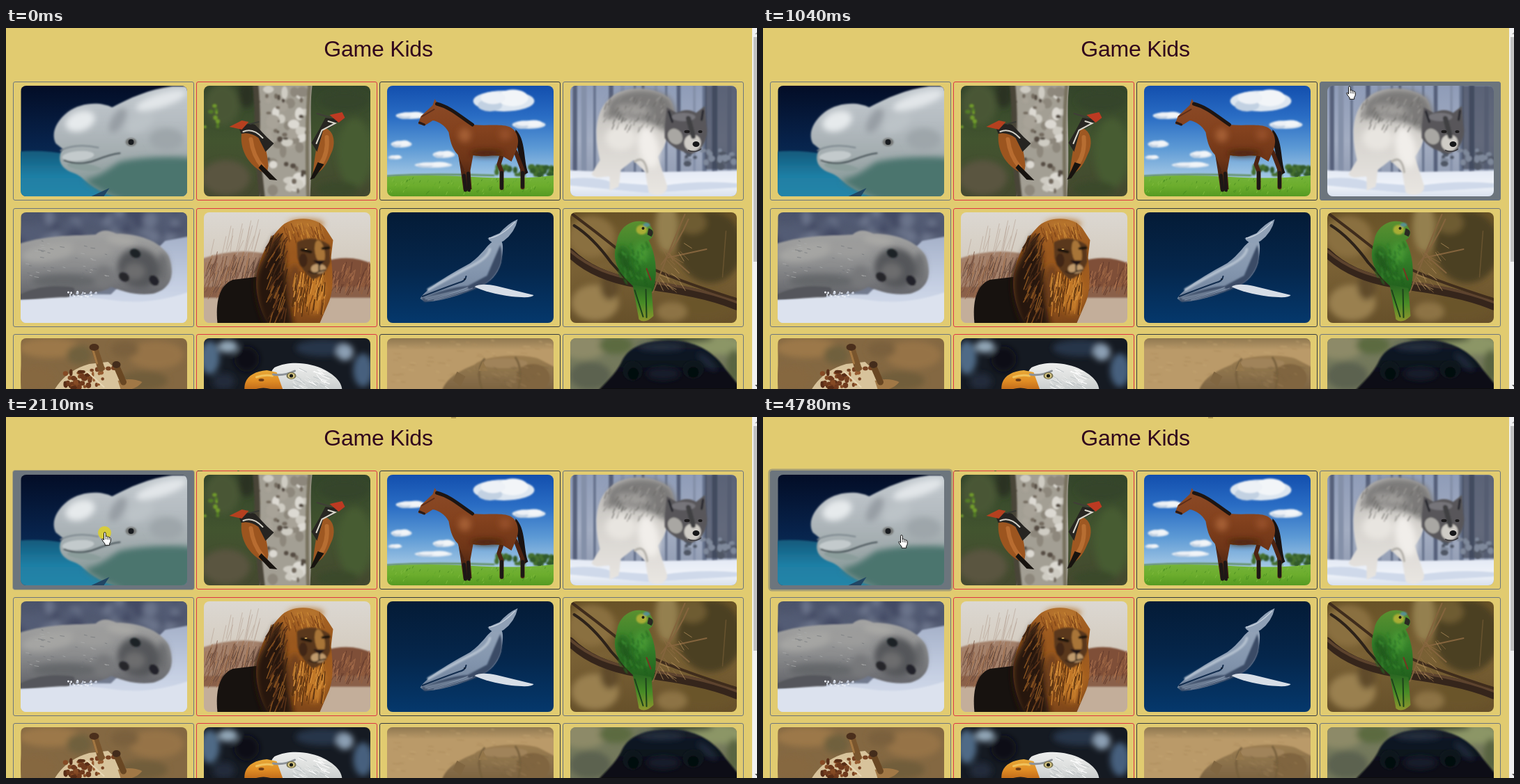
An HTML page that plays this animation: 1078x519 px, repeating every 8000 ms.

```html
<!DOCTYPE html>
<html lang="en">
<head>
<meta charset="utf-8">
<title>Game Kids</title>
<style>
html, body { margin: 0; width: 100%; height: 100%; overflow: hidden; background: #e1cb70; }
#stage { position: relative; width: 1078px; height: 519px; overflow: hidden; }
#stage > * { position: absolute; }
h1 { margin: 0; left: 0; top: 11px; width: 1069px; text-align: center; color: #30051c; letter-spacing: -.2px;
  font: 400 32px/38px "Liberation Sans", Arial, sans-serif; }
.card { box-sizing: border-box; width: 260px; height: 171px; border: 1px solid; border-radius: 3px; }
.photo { position: absolute; left: 9.5px; top: 5px; width: 239px; height: 159px; border-radius: 8px; }
.bar { left: 1071px; top: 0; width: 7px; height: 519px; background: #f1f1f1; }
.thumb { left: 1073px; top: 13px; width: 5px; height: 323px; background: #c1c1c1; }
.mark { background: #6d3930; height: 1px; top: 77px; }
#dot { left: 639px; top: 0; width: 7px; height: 2px; background: #b49d55; }
#ring { left: 132px; top: 157px; width: 19px; height: 19px; border-radius: 50%; background: rgba(222,208,40,.85); }
#hand { left: 0; top: 0; }
</style>
</head>
<body>
<div id="stage">
  <svg width="0" height="0"><defs id="defs">
    <filter id="b1" x="-20%" y="-20%" width="140%" height="140%"><feGaussianBlur stdDeviation="1"/></filter>
    <filter id="b4" x="-30%" y="-30%" width="160%" height="160%"><feGaussianBlur stdDeviation="4"/></filter>
  </defs></svg>
  <h1>Game Kids</h1>
  <div class="bar"></div><div class="thumb"></div>
  <svg style="left:1071px;top:0" width="7" height="519">
    <path d="M4 9L8 5V9Z" fill="#a3a3a3"/><path d="M4 513L8 517V513Z" fill="#505050"/>
  </svg>
</div>
<script>
const stage = document.getElementById('stage');
const defs = document.getElementById('defs');
let seed = 7, gradCount = 0;
const rnd = () => (seed = (seed * 16807) % 2147483647) / 2147483647;
const between = (a, b) => a + rnd() * (b - a);

// Drawing helpers; all photos use stage coordinates.
const P = (d, fill) => `<path d="${d}" fill="${fill}"/>`;
const L = (d, color, w) => `<path d="${d}" fill="none" stroke="${color}" stroke-width="${w}" stroke-linecap="round"/>`;
const E = (x, y, rx, ry, fill, turn = 0) =>
  `<ellipse cx="${x}" cy="${y}" rx="${rx}" ry="${ry}" fill="${fill}" transform="rotate(${turn} ${x} ${y})"/>`;
const R = (x, y, w, h, fill) => `<rect x="${x}" y="${y}" width="${w}" height="${h}" fill="${fill}"/>`;
const soft = (...s) => `<g filter="url(#b1)">${s.join('')}</g>`;
const haze = (...s) => `<g filter="url(#b4)">${s.join('')}</g>`;
function G(...colors) {
  const id = 'g' + gradCount++;
  const stops = colors.map((c, i) => `<stop offset="${i / (colors.length - 1)}" stop-color="${c}"/>`).join('');
  defs.insertAdjacentHTML('beforeend', `<linearGradient id="${id}" x2="0" y2="1">${stops}</linearGradient>`);
  return `url(#${id})`;
}
function specks(n, x, y, w, h, size, ...colors) {
  let s = '';
  for (let i = 0; i < n; i++)
    s += E(between(x, x + w), between(y, y + h), between(.4, 1) * size, between(.4, 1) * size,
      colors[i % colors.length]);
  return s;
}
function strands(n, x, y, w, h, dx, dy, width, ...colors) {
  let s = '';
  for (let i = 0; i < n; i++) {
    const a = between(x, x + w), b = between(y, y + h);
    s += L(`M${a} ${b}l${dx * between(.3, 1)} ${dy * between(.4, 1)}`, colors[i % colors.length], width);
  }
  return s;
}

function beluga() {
  return R(21, 83, 239, 159, G('#030d26', '#07224a', '#0b3a66')) +
    soft(P('M15 178Q50 174 90 182L266 184V250H15Z', G('#135a7c', '#1f7fa5', '#2787a8'))) +
    soft(P('M264 84H238C205 88 176 101 152 114C136 106 108 106 88 121C70 135 64 153 71 166L81 174C75 182 75 194 83 201C90 208 100 208 108 215C124 230 142 240 170 246H264Z',
      G('#c3cacf', '#b4bbc0', '#9fa9ab', '#75908d'))) +
    haze(E(106, 134, 22, 14, '#e6eaec', -20), E(222, 104, 38, 10, '#e2e6e9', -18), E(160, 133, 9, 20, '#979ea4', 30),
      P('M163 192Q210 182 270 187V250H172C150 240 130 232 112 219C140 212 150 199 163 192Z', '#4c746e'),
      E(230, 160, 25, 16, '#9ea6aa'), E(192, 136, 22, 12, '#bcc3c7', -30)) +
    soft(E(103, 184, 23, 7, '#c3cacc', -5), E(112, 200, 25, 5, '#8b9d9b', 8), E(179, 164, 8, 6, '#747776'),
      L('M83 190Q105 199 128 190T163 180', '#434e53', 2), L('M78 176Q100 165 132 172', '#7d878e', 2)) +
    E(179, 164, 4, 4, '#191c20') + P('M122 242L148 230L140 242Z', '#214664');
}

function birds() {
  return R(283, 83, 240, 159, G('#33442a', '#42542f', '#44482f')) +
    haze(E(310, 110, 25, 30, '#485735'), E(315, 215, 35, 25, '#5a543f'), E(485, 105, 35, 15, '#35452c'),
      E(500, 180, 25, 50, '#465c33'), E(345, 95, 12, 20, '#2b3324'), E(475, 232, 30, 12, '#3a4a2b')) +
    soft(specks(10, 285, 110, 20, 35, 4, '#6f9a2c', '#527a28')) +
    P('M357 83H439C434 120 441 170 436 242H363C373 200 352 160 360 120Z', '#a39f94') +
    soft(specks(45, 372, 88, 55, 150, 10, '#cfccc3', '#8d877b', '#dcd9d2', '#a8a398'),
      specks(25, 362, 86, 70, 152, 4, '#544c42', '#736b5f'),
      L('M358 84Q361 120 360 145T367 241', '#4a4438', 8), L('M435 84Q430 140 433 241', '#78725f', 5)) +
    P('M338 149C334 172 345 198 374 210L376 198C374 176 370 158 358 147Z', '#9c551f') +
    L('M351 160Q354 184 368 200', '#b86c30', 6) +
    P('M366 196L389 219L378 218L362 201Z', '#17130f') +
    P('M334 144Q345 135 357 139L374 157L384 166L372 178L362 158Q350 149 337 152Z', '#262421') +
    L('M340 149Q354 143 368 158', '#d5d2c7', 2) + P('M320 142L338 133L348 135L338 146Z', '#b5401f') +
    L('M350 138L362 135', '#393a34', 2) +
    P('M453 143C470 144 475 165 465 183C458 201 448 211 440 209C442 190 446 160 453 143Z', '#9e5822') +
    L('M460 157Q462 180 451 196', '#b76e32', 6) + P('M447 193L436 218L442 216L456 196Z', '#17130f') +
    P('M458 129L478 131Q470 144 455 146L446 178L438 165L449 146Z', '#282622') +
    L('M462 134L472 137L453 147L445 166', '#d9d6ca', 2) + P('M464 125L482 121L486 129L477 136Z', '#bd3a22') +
    L('M446 123L466 129', '#403e37', 2);
}

function horse() {
  const cloud = (x, y, w, h) => E(x, y, w, h, '#dde6f0') + E(x - w * .45, y + h * .4, w * .4, h * .6, '#c2d1e2') +
    E(x + w * .3, y - h * .3, w * .5, h * .8, '#f2f5f8') + E(x - w * .35, y - h * .3, w * .4, h * .6, '#edf1f6');
  return R(546, 83, 240, 135, G('#134fae', '#2a6dc4', '#5d9ad5', '#a9cbe6')) +
    soft(cloud(714, 105, 44, 15), cloud(750, 139, 24, 6), cloud(581, 126, 22, 5),
      cloud(567, 167, 15, 5), cloud(628, 182, 16, 5), cloud(613, 197, 27, 4), cloud(558, 186, 10, 3)) +
    soft(specks(30, 700, 200, 86, 12, 6, '#456f2f', '#315a29'), L('M546 213Q600 209 700 212', '#4b7a35', 2)) +
    P('M546 214Q600 210 670 214T786 212V242H546Z', G('#74b33a', '#6cad2d', '#559a22')) +
    strands(90, 546, 216, 238, 24, 2, -4, .8, '#84be42', '#468a20', '#61a62d') +
    P('M731 146C746 160 742 190 749 208L740 213C734 195 738 175 729 160Z', '#1a1312') +
    L('M712 180L707 196L711 206V230M731 178L741 204V229', '#4d2412', 6) +
    L('M651 178L655 203L659 232', '#4f2613', 6) +
    P('M612 111L615 102L620 110C638 116 652 131 669 139C692 141 712 137 724 143C736 150 737 166 731 178L725 192L712 184C696 182 684 186 670 183L666 205L668 232H660L658 205L648 182C639 173 637 161 635 150C630 140 620 134 612 133L601 140L591 138L595 127Z',
      G('#8b4a27', '#84421e', '#6e3517', '#3a1c0f')) +
    haze(E(658, 154, 9, 10, '#a45f35'), E(716, 153, 9, 8, '#95502a'), E(690, 180, 24, 4, '#45200f')) +
    L('M618 109C638 114 652 128 669 139', '#1d1512', 5) +
    L('M663 209L664 233M657 212L659 233M711 208V230M741 208V228', '#1d1716', 5) +
    L('M597 127L614 117', '#5d2d18', 2) + L('M593 136L600 139', '#2b1a16', 3);
}

function wolf() {
  let trees = '';
  for (let x = 812; x < 1050; x += 17)
    trees += R(x + between(-4, 4), 80, between(3, 8), 128, ['#66728c', '#8490a8', '#56617a'][x % 3]);
  return R(809, 83, 240, 159, G('#8f9cb8', '#a3adc2', '#8a95ac')) +
    soft(trees, R(1003, 83, 50, 120, 'rgba(54,61,78,.6)'), specks(24, 975, 170, 73, 30, 6, '#4f5665', '#7f899b')) +
    soft(P('M800 204Q850 207 900 207T1056 205V248H800Z', G('#e3e9f4', '#f0f4fa', '#d0d9e9')),
      P('M804 217Q845 212 870 222L940 227Q1000 218 1056 224V229L920 237L804 226Z', '#cfd9ea')) +
    soft(P('M868 100C885 84 925 82 950 100C962 112 958 140 950 152C946 168 942 176 935 185L948 225C952 240 930 244 922 236L917 207L900 190L882 204L879 228L866 234L866 214C860 212 846 219 840 210L852 190C845 160 842 120 868 100Z',
      G('#bab8b5', '#d8d5d0', '#e9e6e2'))) +
    haze(P('M866 105C885 86 925 82 952 100C972 130 960 150 946 148C915 128 880 128 858 130Z', '#7b7a79'),
      E(882, 158, 22, 18, '#e8e5e0'), E(922, 172, 14, 30, '#f1eeea', -12), E(900, 118, 26, 7, '#a09e9b', 8)) +
    soft(strands(70, 860, 98, 85, 45, -5, 9, 1.2, '#6d6c69', '#a19f9b', '#8b8986'), L('M902 192Q916 182 920 207', '#b5b2ac', 3)) +
    soft(P('M945 142L948 114L962 122Q978 114 990 122L1003 112L1005 140C1008 155 1002 166 996 175L984 181C968 178 952 170 945 158Z', '#58575a'),
      E(960, 156, 10, 12, '#a9a7a3', -35), E(985, 165, 12, 12, '#cfccc6'), E(972, 128, 17, 6, '#76757a'),
      L('M951 120L956 135M1000 119L998 132', '#222429', 3), L('M979 130L986 156', '#3f3f43', 7)) +
    E(977, 149, 4, 2.2, '#1c1b1c') + E(996, 149, 3, 2, '#1c1b1c') +
    E(990, 167, 5, 4, '#161719') + L('M979 176Q989 180 997 174', '#353337', 1.5);
}

function seal() {
  return R(21, 264, 240, 160, G('#4a526a', '#5f687e', '#8a92a5')) +
    haze(specks(45, 21, 264, 239, 45, 12, '#424a63', '#6a738a', '#535c74')) +
    soft(P('M228 306L270 298V430H14V390Q90 381 150 383Z', G('#a5b1c9', '#c3cde1', '#dde4f0'))) +
    soft(P('M13 312C60 296 104 299 128 297Q140 286 158 296C190 296 220 305 233 328C243 355 236 376 210 382C185 385 165 378 150 372C130 386 90 382 60 390H13Z',
      G('#a3a3a2', '#8c8d8e', '#5f6066'))) +
    haze(E(62, 322, 41, 13, '#a5a5a3', -10), E(123, 318, 30, 12, '#9c9c9b'), E(83, 364, 47, 10, '#65676b'),
      E(165, 305, 22, 7, '#a9a8a5', 10), E(224, 345, 9, 22, '#6d6e71'), E(140, 358, 14, 16, '#77787a')) +
    haze(E(190, 345, 31, 28, '#55565a', 25), E(184, 350, 15, 12, '#6d6d6e')) +
    soft(P('M14 386Q50 366 96 373Q103 381 85 390H14Z', '#55565b'),
      E(185, 324, 8, 6, '#1f2127', 25), E(212, 363, 8, 6, '#212229', 50), E(169, 358, 8, 6, '#25262c', 35)) +
    strands(40, 24, 305, 120, 60, 6, 1, .7, '#adaeae', '#75777b') +
    specks(26, 85, 378, 45, 9, 2, '#c4cbda', '#e9edf4') +
    soft(P('M14 393Q95 382 150 391T266 378V430H14Z', '#dce2ee'));
}

function lion() {
  return R(283, 264, 240, 160, G('#dcd8d2', '#d3cabd', '#c7b8a3')) +
    soft(P('M280 332Q330 314 380 326V392H280Z', '#a3806a'), P('M455 336Q495 324 526 340V392H455Z', '#7f4f38'),
      R(280, 372, 250, 20, '#8a604a'), R(280, 388, 250, 43, '#c3ae9a')) +
    strands(150, 283, 345, 85, 45, 9, -26, .8, '#7b5340', '#a2714d', '#5f4438') +
    strands(80, 463, 348, 60, 37, 6, -16, 1, '#96603f', '#643b2c', '#a96f4c') +
    strands(15, 285, 318, 73, 12, 12, -48, .6, '#b5a294') +
    P('M303 424C300 395 305 370 325 362L366 357L400 400L395 424Z', '#17120f') +
    P('M393 287C408 270 445 270 458 288L469 305L466 330C469 355 470 380 462 396L450 424H375C361 400 354 370 362 343C368 320 380 300 393 287Z',
      G('#a96525', '#9a581e', '#a35e1f', '#7d4519')) +
    haze(P('M388 296C404 312 398 361 412 430H372C358 399 352 365 362 344Z', '#261710'),
      E(442, 380, 15, 30, '#c07626'), E(430, 282, 26, 7, '#b7762f'), E(414, 370, 10, 30, '#70401a')) +
    strands(70, 380, 295, 24, 110, -11, 24, 1.5, '#3c2313', '#84501f', '#5a3218') +
    strands(110, 412, 350, 46, 45, -4, 22, 1.3, '#c27b2b', '#764014', '#d8923c', '#55300f') +
    strands(60, 398, 280, 56, 18, 5, 14, 1.3, '#c88634', '#84491a', '#a9682a') +
    soft(P('M417 308Q440 296 464 312L465 336Q457 358 439 361Q424 350 418 331Z', '#5a381c'),
      E(450, 322, 7, 17, '#a87438', -10), E(448, 346, 11, 7, '#bf9a6c'), E(426, 334, 6, 10, '#3f2613'),
      L('M424 319L437 322M454 317L463 316', '#1c130f', 4), P('M440 334L458 334L450 342Z', '#211917'),
      L('M449 341V350Q442 355 434 350M449 350L458 348', '#2f2018', 2)) + E(430, 318, 2, 1, '#cfa353');
}

function whale() {
  return R(546, 264, 240, 160, G('#041b36', '#05264b', '#05386c')) +
    P('M594 389C603 374 638 353 666 338C684 325 690 312 697 308L707 304C714 305 714 318 710 338C705 355 695 365 680 371C655 383 620 395 600 393Z',
      G('#93a3b8', '#8496ae', '#70829b')) +
    P('M691 303Q700 298 708 295Q720 281 734 275Q730 294 714 306L706 310Q694 309 691 302Z', '#8fa0b6') +
    soft(P('M596 389Q638 372 662 371L690 356Q699 335 709 312Q715 333 706 348Q695 367 678 373Q646 387 600 394Z', '#3a4b66'),
      L('M606 376Q644 354 668 342T694 318', '#b3c0cf', 4), L('M602 389Q632 382 662 375', '#7889a0', 3)) +
    L('M597 386Q625 375 650 366Q659 364 660 357', '#132d4e', 2) +
    L('M605 391Q635 385 662 373M614 391Q645 383 669 374', '#93a4ba', .8) +
    P('M672 372Q681 366 704 371L757 384Q755 389 725 386Q690 381 672 372Z', '#d7dee7') +
    E(658, 361, 1.5, 1, '#111c2e') + L('M693 302Q710 300 730 279', '#c3cedb', 1.5);
}

function parrot() {
  return R(809, 264, 240, 160, G('#685227', '#7a6135', '#66502a')) +
    haze(E(840, 300, 34, 30, '#8a6f40'), E(948, 285, 16, 38, '#94804f'), E(1010, 315, 47, 52, '#4c3f20'),
      E(1000, 400, 40, 20, '#6b5529'), E(845, 395, 34, 26, '#9a8050'), E(955, 408, 22, 14, '#8d7344'),
      E(866, 371, 13, 20, '#604c2a'), E(985, 280, 20, 16, '#6e5b33')) +
    L('M809 323C835 349 870 361 905 367S1000 379 1048 399', '#35251b', 13) +
    L('M809 320C839 346 870 356 905 362S1000 374 1048 394', '#5d432e', 4) +
    L('M809 265Q845 292 880 320T1048 390', '#3f2c1c', 4) + L('M815 284Q842 301 868 337L889 360', '#2d2219', 4) +
    L('M974 268Q958 304 946 335L928 380M979 275Q966 306 940 340M949 325L980 352M950 330L1005 318', '#84643d', 2) +
    strands(25, 934, 307, 40, 65, 14, 13, .8, '#8e6c43', '#b08d5a') + L('M1033 292L1028 358', '#68532f', 1.5) +
    P('M878 300C885 280 905 274 920 280C930 288 932 300 922 305C932 325 935 350 930 372C928 385 915 385 905 375C885 360 870 340 874 318Z',
      G('#5a9030', '#338029', '#1f5b1b')) +
    P('M899 369L926 374L929 414Q917 426 908 419Z', G('#296522', '#478b26', '#8f962e')) +
    haze(E(888, 336, 9, 22, '#215c1d', -15), E(912, 322, 9, 14, '#4a9a35')) +
    soft(strands(55, 879, 308, 42, 56, 4, 9, 1.2, '#1c5a1c', '#3f9433', '#2c7728')) +
    L('M902 377L914 415M918 376L919 416', '#1d421b', 2) +
    soft(E(912, 290, 8, 7, '#a9ad34'), E(919, 283, 5, 3, '#568f93')) +
    P('M922 288Q932 291 926 300L920 297Z', '#292923') + E(914, 288, 2, 2, '#231f16') + L('M919 346L925 362', '#7b3322', 2);
}

function giraffe() {
  return R(21, 446, 240, 160, '#846842') +
    haze(E(63, 460, 45, 14, '#9c7848'), E(105, 470, 18, 14, '#6f603e'), E(215, 470, 40, 20, '#967347'),
      E(197, 507, 35, 14, '#715d3b'), E(40, 503, 28, 17, '#86683f'), E(170, 462, 20, 12, '#7a603c')) +
    P('M68 522C77 505 94 490 119 483L146 480L169 502L182 522Z', '#d8c39b') +
    P('M160 507Q180 502 195 509Q187 520 165 522Z', '#a17846') +
    specks(34, 84, 494, 36, 25, 5, '#6f3a1d', '#854a24', '#592d16') +
    specks(14, 120, 488, 36, 30, 4, '#784322', '#955b30') +
    L('M127 462L136 489', '#79552d', 10) + L('M124 462L130 482', '#a37742', 3) + E(126, 459, 7, 5, '#4b2f1c') +
    L('M158 486L168 509', '#694723', 9) + E(158, 484, 6, 5, '#432c1b') + L('M116 494L140 516', '#e7d7b4', 2);
}

function eagle() {
  return R(283, 446, 240, 160, '#151a22') +
    haze(E(292, 474, 14, 24, '#506a86'), E(318, 458, 14, 9, '#93a7b8'), E(345, 476, 18, 18, '#0c0f15'),
      E(455, 460, 40, 12, '#26344a'), E(486, 466, 12, 12, '#8b9fb3'), E(512, 492, 14, 24, '#46607e'),
      E(312, 508, 16, 12, '#20293a')) +
    P('M390 525C377 510 376 496 385 488C408 477 439 482 456 491C477 502 483 513 482 525Z', G('#edeeed', '#dcdedd', '#c3c8c9')) +
    strands(50, 411, 489, 48, 27, 12, 6, 1, '#fff', '#c0c6c8', '#e9ebea') +
    P('M342 522C340 504 352 494 374 492L388 495L397 520L389 523Q369 512 349 523Z', G('#e8aa38', '#e08c24', '#b96318')) +
    L('M359 502Q370 498 382 500', '#f0c25c', 3) + E(366, 506, 4, 2, '#6e3d16') + L('M383 498Q397 501 414 493', '#8d9298', 3) +
    E(409, 500, 7, 5, '#77714e') + E(409, 500, 5, 4, '#d8c782') + E(409, 500, 2.6, 2.6, '#171914');
}

function rhino() {
  return R(546, 446, 240, 160, '#ba9a69') +
    R(546, 446, 240, 17, G('#8f7850', '#ba9a69')) +
    soft(strands(70, 548, 449, 235, 64, 10, 1, 1, '#aa8a5a', '#c6a774', '#b18f5f')) +
    soft(P('M624 524C632 501 651 493 672 484C688 470 737 468 763 475L792 490V525Z', G('#9c7e51', '#8b714b', '#78603f')),
      E(714, 482, 34, 7, '#a0835a'), E(756, 503, 24, 20, '#806540'),
      L('M686 476Q673 492 683 520M731 474Q742 490 735 520', '#77603d', 3)) +
    P('M641 507L647 494L659 501L652 515Z', '#806641') + P('M678 493L684 479L691 493Z', '#93764a') +
    soft(strands(35, 660, 485, 115, 29, 9, 4, .8, '#75603f', '#a1855a'));
}

function panther() {
  return R(809, 446, 240, 160, '#74795c') +
    haze(E(828, 458, 34, 18, '#8d8a68'), E(875, 456, 24, 13, '#5c6a40'), E(838, 500, 30, 20, '#5c6250'),
      E(1018, 456, 42, 14, '#8c9666'), E(1044, 486, 10, 24, '#59643f'), E(970, 446, 45, 6, '#3c4630')) +
    soft(P('M846 525C862 508 876 496 884 478C895 455 925 449 955 449C990 450 1016 466 1032 490L1050 512V525Z',
      G('#141d2b', '#0d121c', '#07090f'))) +
    haze(E(940, 459, 32, 5, '#253142'), E(1006, 480, 18, 5, '#202c3c', 42), E(943, 497, 24, 9, '#171f2b')) +
    soft(E(899, 493, 14, 14, '#10161f'), E(986, 491, 15, 13, '#10161f'), E(900, 497, 8, 9, '#06080d'), E(986, 495, 8, 8, '#06080d'));
}

const photos = [beluga, birds, horse, wolf, seal, lion, whale, parrot, giraffe, eagle, rhino, panther];
const borders = ['#6c757d', '#dc3545', '#343a40', '#6c757d'];
const cards = photos.map((draw, i) => {
  const col = i % 4, row = Math.floor(i / 4);
  const x = Math.round(10.4 + 262.8 * col), y = Math.round(77.2 + 181.6 * row);
  const card = document.createElement('div');
  card.className = 'card';
  card.style.cssText = `left:${x}px;top:${y}px;border-color:${borders[col]}`;
  card.innerHTML = `<svg class="photo" viewBox="${x + 10.5} ${y + 6} 239 159">${draw()}</svg>`;
  stage.append(card);
  return card;
});

stage.insertAdjacentHTML('beforeend', `
  <div class="mark" id="dot"></div>
  <div class="mark" id="nickA" style="left:332px;width:3px"></div>
  <div class="mark" id="nickB" style="left:275px;width:7px"></div>
  <div id="ring"></div>
  <svg id="hand" width="14" height="20" viewBox="0 0 14 20">
    <path d="M3.5 12V2.3Q3.5 .8 4.8 .8T6.2 2.3V7Q6.6 6.1 7.5 6.3T8.7 7.6Q9.1 6.9 9.9 7.2T11 8.5Q11.4 7.9 12.2 8.2T13.3 9.7V13Q13.2 15 11.7 16.6V19.3H5V17.2Q2.5 14.8 1 11.6Q.4 10.3 1.3 10T3.5 12Z" fill="#fff" stroke="#111"/>
    <path d="M6.2 7V11M8.7 8V11.3M11 8.7V11.5" fill="none" stroke="#222" stroke-width=".8"/>
  </svg>`);

const LOOP = 8000;
function play(el, prop, steps) {
  const frames = steps.map(([t, v]) => ({ offset: t / LOOP, [prop]: v, easing: 'step-end' }));
  frames.push({ ...frames[frames.length - 1], offset: 1 });
  el.animate(frames, { duration: LOOP, iterations: Infinity }).startTime = 0;
}
const shown = (id, ...times) => play(document.getElementById(id), 'opacity',
  [[0, 0], ...times.map((t, i) => [t, i % 2 ? 0 : 1])]);

// The pointer sweeps over the top edge, slows down beside the first card, then settles on it.
const path = [
  [0, 1040, 476], [980, 934, 245], [1040, 837, 83], [1110, 738, 18], [1180, 634, -18],
  [1250, 450, 24], [1320, 328, 76], [1390, 270, 58], [1460, 240, 84], [1530, 180, 124],
  [1590, 148, 155], [1650, 137, 165], [4590, 146, 165], [4650, 166, 167], [4710, 184, 168], [4780, 194, 169]
];
const tint = a => `rgba(108,117,125,${a})`;
const focus = w => `0 0 0 ${w}px ${tint(.5)}`;

play(document.getElementById('hand'), 'transform', path.map(([t, x, y]) => [t, `translate(${x}px,${y}px)`]));
shown('hand', 910);
shown('dot', 1250);
shown('nickA', 1390);
shown('nickB', 1460);
shown('ring', 2110, 2250, 4120, 4250);
play(cards[3], 'backgroundColor', [[0, tint(0)], [980, tint(.4)], [1040, tint(1)], [1110, tint(.5)], [1180, tint(0)]]);
play(cards[0], 'backgroundColor', [[0, tint(0)], [1390, tint(.4)], [1460, tint(1)]]);
play(cards[0], 'boxShadow', [[0, focus(0)], [2110, focus(.8)], [2180, focus(1.7)], [2250, focus(2.5)]]);
</script>
</body>
</html>
```
